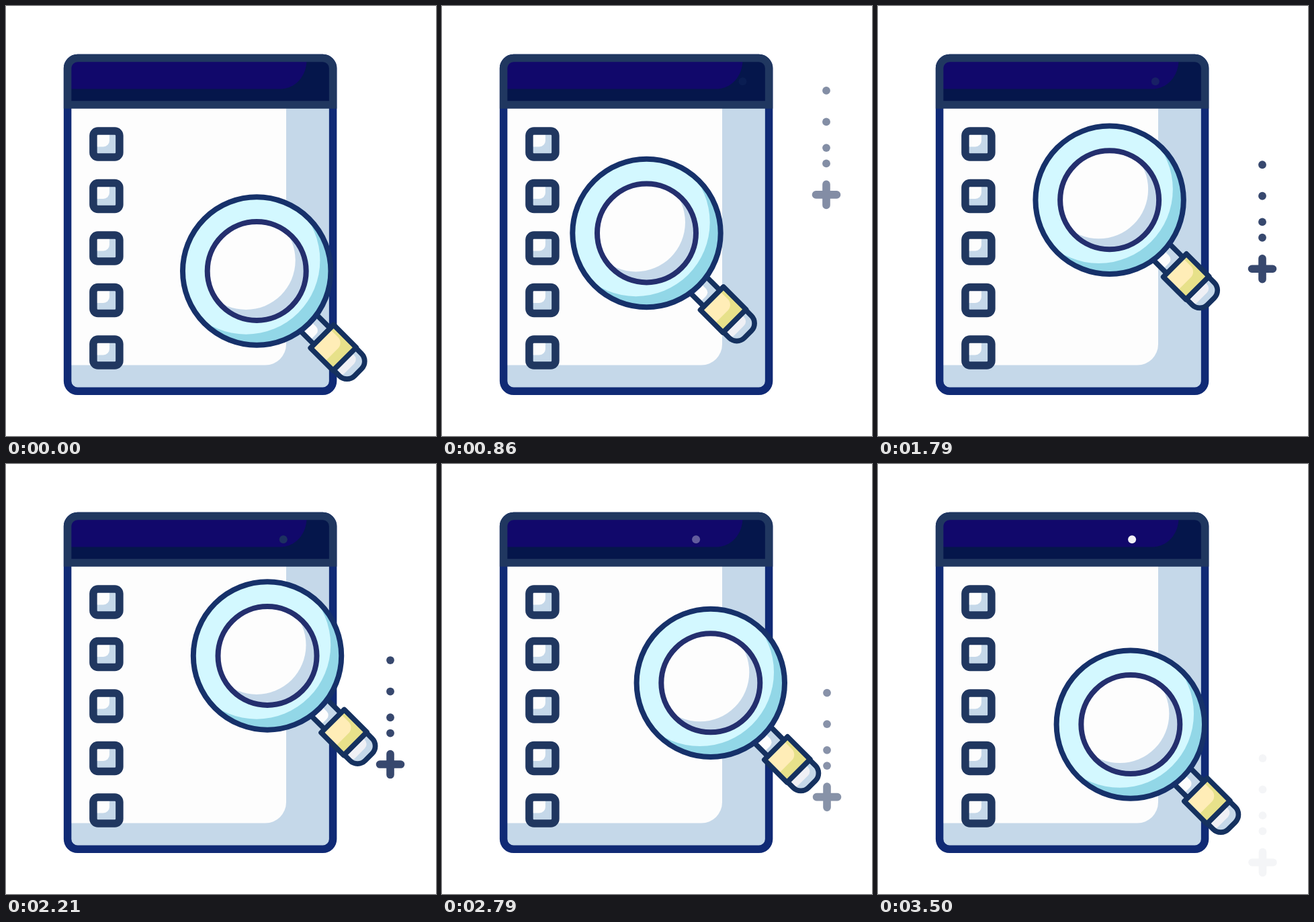
An HTML page with a canvas for the animation above (3.57 s loop, 640 by 640 pixels).

```html
<!DOCTYPE html>
<html lang="en">
<head>
<meta charset="utf-8">
<title>Search list</title>
<style>
html, body { margin: 0; width: 100%; height: 100%; overflow: hidden; background: #fff; }
canvas { display: block; width: 100vw; height: 100vh; }
</style>
</head>
<body>
<canvas id="stage" width="640" height="640"></canvas>
<script>
const ctx = document.getElementById('stage').getContext('2d');
const LOOP = 3570, STEPS = 50, PHASES = 3;
const WHITE = '#fdfdfd', SHADE = '#c5d8e9', INK = '#203760';

// Chains of cubic Bezier curves, one curve per phase.
const lensPath = [
  [373.2, 394.5], [344.6, 370.3], [300, 344.8],
  [287.5, 312], [323.8, 286], [363.7, 285],
  [407, 285.5], [403.7, 330.8], [387.8, 355.2],
  [373.2, 394.5]
];
const trailPath = [
  [572, 24], [572, 70], [572, 118],
  [572, 166.5], [572, 210], [572, 259.5],
  [572, 315], [573.5, 328.7], [573.5, 377],
  [572.3, 451]
];

function along(path, phase, s) {
  const [a, b, c, d] = path.slice(phase * 3, phase * 3 + 4);
  const r = 1 - s;
  return [0, 1].map(i =>
    r * r * r * a[i] + 3 * r * r * s * b[i] + 3 * r * s * s * c[i] + s * s * s * d[i]);
}

function paint(fill, stroke, width) {
  if (fill) { ctx.fillStyle = fill; ctx.fill(); }
  if (stroke) { ctx.strokeStyle = stroke; ctx.lineWidth = width; ctx.stroke(); }
}

function box(x0, y0, x1, y1, r, fill, stroke, width) {
  ctx.beginPath();
  ctx.roundRect(x0, y0, x1 - x0, y1 - y0, r);
  paint(fill, stroke, width);
}

function disc(x, y, r, fill, stroke, width) {
  ctx.beginPath();
  ctx.arc(x, y, r, 0, Math.PI * 2);
  paint(fill, stroke, width);
}

function drawPage() {
  const left = 91.6, right = 486.6, top = 77.6, fold = 147;
  box(left, top, right, 573.3, 15, SHADE);
  box(left, fold, 417, 534.5, [0, 0, 31, 0], WHITE);
  box(left, top, right, 573.3, 15, null, '#102a75', 11.5);

  box(left, top, right, fold, [15, 15, 0, 0], '#05164b');
  ctx.beginPath();
  ctx.moveTo(left, 80);
  ctx.lineTo(447.5, 80);
  ctx.bezierCurveTo(447.5, 104, 431, 123.5, 408, 123.5);
  ctx.lineTo(left, 123.5);
  paint('#11086b');
  box(left, top, right, fold, [15, 15, 0, 0], null, INK, 11.5);

  for (let i = 0; i < 5; i++) drawCheckbox(129.9, 186 + i * 77.5);
}

function drawCheckbox(x, y) {
  box(x, y, x + 39, y + 39, 7, SHADE);
  box(x, y, x + 24, y + 23.4, [0, 0, 9, 0], WHITE);
  box(x, y, x + 39, y + 39, 7, null, INK, 11.5);
}

// One dot per phase, stepping left and fading in.
function drawHeaderDot(phase, s) {
  ctx.globalAlpha = s;
  disc(447.5 - 34.7 * phase, 112.3, 6, ['#0c2055', INK, '#fff'][phase]);
  ctx.globalAlpha = 1;
}

function drawTrail(x, y, alpha) {
  const color = '#37486e';
  ctx.globalAlpha = alpha;
  for (const dy of [0, 46.5, 85.2, 108.5]) disc(x, y + dy, 5.9, color);
  ctx.lineCap = 'round';
  ctx.beginPath();
  ctx.moveTo(x - 15.5, y + 155);
  ctx.lineTo(x + 15.5, y + 155);
  ctx.moveTo(x, y + 139.5);
  ctx.lineTo(x, y + 170.5);
  paint(null, color, 11.6);
  ctx.globalAlpha = 1;
}

function drawHandle() {
  const ink = '#15315f', w = 7.7;
  ctx.save();
  ctx.rotate(Math.PI / 4);
  ctx.lineJoin = 'round';
  box(100, -17, 138, 17, 0, SHADE);
  box(100, -4, 129, 17, [0, 8, 0, 0], WHITE);
  box(100, -17, 138, 17, 0, null, ink, w);

  const cap = [0, 16, 16, 0];
  box(185, -23.3, 213.2, 23.3, cap, SHADE);
  box(185, -14, 200, 20, [0, 9, 4, 0], '#eff0f5');
  box(185, -23.3, 213.2, 23.3, cap, null, ink, w);

  box(137.5, -24.3, 185, 24.3, 0, '#e7e18a');
  box(137.5, -16, 167, 24.3, [0, 12, 0, 0], '#ffedb7');
  box(137.5, -24.3, 185, 24.3, 0, null, ink, w);
  ctx.restore();
}

// A disc whose lit part is the same disc shifted up and left.
function litDisc(r, lit, dark, rim) {
  disc(0, 0, r, dark);
  ctx.save();
  ctx.clip();
  disc(-16, -16, r, lit);
  ctx.restore();
  disc(0, 0, r, null, rim, 8);
}

function drawLens(x, y) {
  ctx.save();
  ctx.translate(x, y);
  drawHandle();
  litDisc(110.2, '#d3f8ff', '#92d7e7', '#16316a');
  litDisc(73.5, WHITE, SHADE, '#242f6e');
  ctx.restore();
}

function render(now) {
  const step = Math.floor((now % LOOP + 5) * STEPS / LOOP);
  const p = Math.min(STEPS - 1, step) / STEPS;
  const phase = Math.floor(p * PHASES), s = p * PHASES - phase;
  const fade = Math.min(1, (p / .5) ** .65, (1 - p) / .37);

  ctx.fillStyle = '#fff';
  ctx.fillRect(0, 0, 640, 640);
  drawPage();
  drawHeaderDot(phase, s);
  drawLens(...along(lensPath, phase, s));
  drawTrail(...along(trailPath, phase, s), fade);
}

let start;
function tick(now) {
  start ??= now;
  render(now - start);
  requestAnimationFrame(tick);
}
render(0);
requestAnimationFrame(tick);
</script>
</body>
</html>
```
